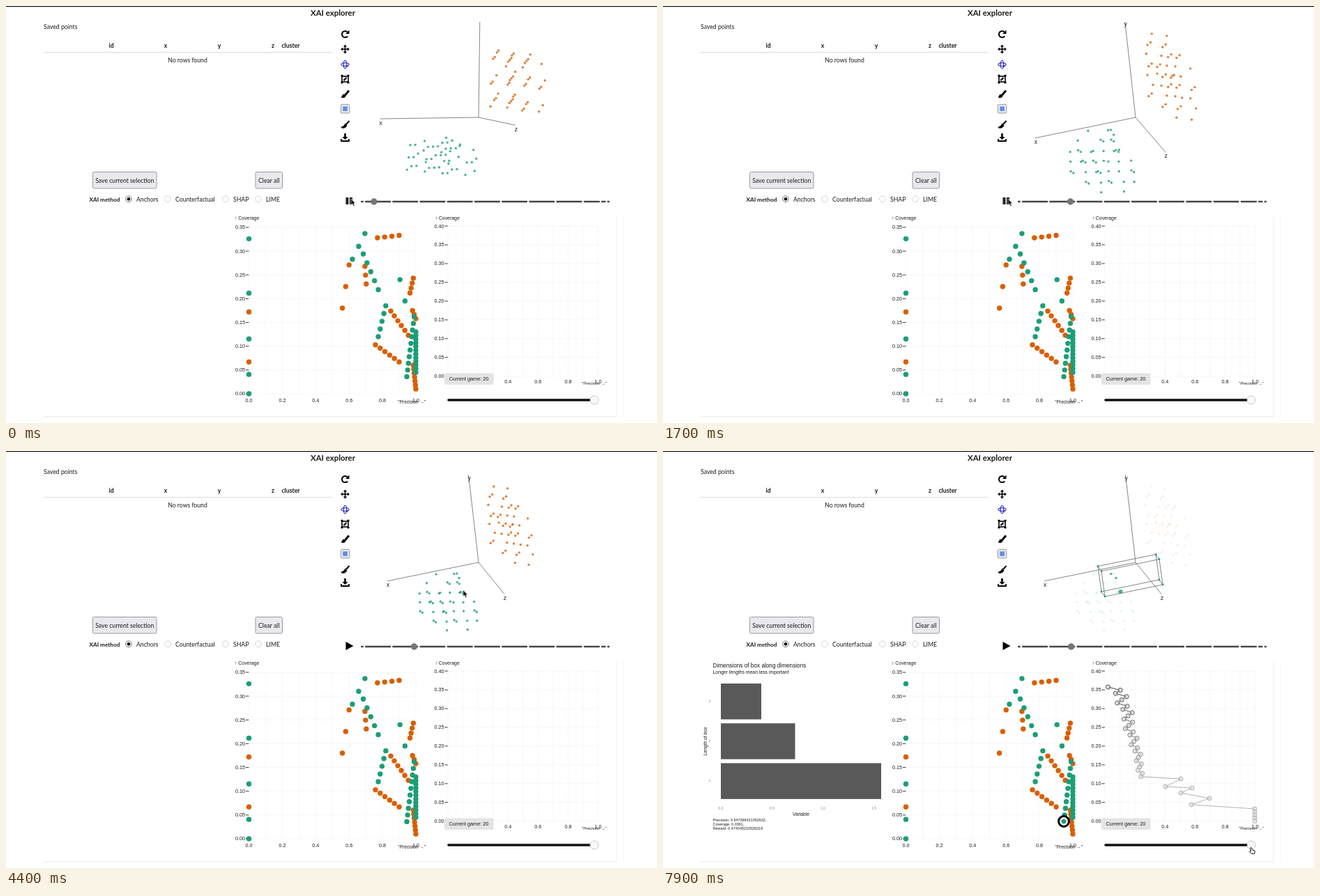
An HTML page that plays this animation: 934x599 px, repeating every 8 s.

```html
<!DOCTYPE html>
<html lang="en">
<head>
<meta charset="utf-8">
<title>XAI explorer</title>
<style>
html, body { margin: 0; width: 100%; height: 100%; overflow: hidden; background: #fff; }
svg { display: block; width: 934px; height: 599px; }
text { fill: #1b1b1b; }
.ui { font: 8.7px Lato, sans-serif; }
.b { font-weight: 700; }
.plot { font-family: "Liberation Sans", Arial, sans-serif; }
.grid { stroke: #eee; stroke-width: .8; stroke-dasharray: 2 1.5; }
.icon { fill: none; stroke: #000; stroke-width: 2; }
</style>
</head>
<body>
<svg id="stage" viewBox="0 0 934 599" xmlns="http://www.w3.org/2000/svg"></svg>
<script>
const LOOP = 8000, CX = 678, CY = 160, AXIS = 151;
const GREEN = '#1b9e77', ORANGE = '#d95f02';

const steps = (n, f) => Array.from({ length: n }, (_, i) => f(i));
const mix = (a, b, f) => a + (b - a) * f;
const spread = (i, k) => (i * k) % 1;

// Evenly scattered points inside a box given by its two corners.
const scatter = (n, lo, hi) => steps(n, i =>
  [.8192, .6711, .5497].map((k, d) => mix(lo[d], hi[d], spread(i + 1, k))));
const orangeCloud = scatter(48, [-80, 10, -95], [-28, 105, 95]);
const greenCloud = [[29, -33, -54], [25, -36, -40], [32, -40, 9.5],
  ...scatter(45, [18, -78, -90], [102, -30, 90])];

// Runs of evenly spaced dots: precision and coverage at both ends, then the count.
const run = ([p1, c1, p2, c2, n]) => steps(n, i => [mix(p1, p2, i / (n - 1)), mix(c1, c2, i / (n - 1))]);
const greenDots = [
  ...steps(5, i => [0, .326 * (1 - i / 4) ** 1.5]),
  ...[[.62, .283, .695, .337, 3], [.685, .294, .775, .219, 5], [.82, .185, .775, .12, 5],
    [.905, .24, .935, .195, 2], [.99, .162, .946, .036, 10], [1, .13, 1, .045, 12]].flatMap(run)];
const orangeDots = [[0, .172, 0, .067, 2], [.56, .18, .6, .271, 3], [.695, .268, .703, .231, 3],
  [.77, .328, .9, .333, 4], [.985, .243, .965, .212, 4], [.85, .174, .955, .123, 6],
  [.758, .103, .9, .067, 6], [.98, .175, 1, .158, 3], [.985, .06, 1, .01, 7]].flatMap(run);

// A narrow zigzag down, a few wide swings, then a drop at full precision.
const trail = [
  ...steps(29, i => [638.5 + 45 * (i / 28) ** .8 + 24 * spread(i, .618) * (1 - i / 40), 339 + 4.6 * i]),
  [743, 471], [721, 482], [759, 484], [743, 491], [784, 499], [758, 508],
  ...steps(5, i => [849, 514 + 4.4 * i])];

const line = (x1, y1, x2, y2, extra = '') => `<line x1="${x1}" y1="${y1}" x2="${x2}" y2="${y2}" ${extra}/>`;
const dot = (x, y, r, fill, extra = '') => `<circle cx="${x}" cy="${y}" r="${r}" fill="${fill}" ${extra}/>`;
const rect = (x, y, w, h, fill, extra = '') => `<rect x="${x}" y="${y}" width="${w}" height="${h}" fill="${fill}" ${extra}/>`;
const ui = (x, y, s, cls = '', extra = '') => `<text x="${x}" y="${y}" class="ui ${cls}" ${extra}>${s}</text>`;
const plot = (x, y, s, size, anchor = 'start', extra = '') =>
  `<text x="${x}" y="${y}" class="plot" font-size="${size}" text-anchor="${anchor}" ${extra}>${s}</text>`;
const MID = 'text-anchor="middle"';

function table() {
  return rect(0, 0, 934, 1.2, '#111') +
    ui(469, 13.5, 'XAI explorer', 'b', MID + ' style="font-size:11.4px"') +
    ui(54, 32.5, 'Saved points') +
    [['id', 151], ['x', 229], ['y', 306], ['z', 383], ['cluster', 408.5]].map(([s, x]) => ui(x, 60, s, 'b', MID)).join('') +
    line(54, 66.5, 467, 66.5, 'stroke="#ddd"') +
    ui(260.5, 81, 'No rows found', '', MID);
}

function controls() {
  const button = (x, w, s) =>
    rect(x, 238.5, w, 23.5, '#e9e9ed', 'rx="2" stroke="#9a9aa3"') + ui(x + w / 2, 253.5, s, '', MID);
  const radio = (x, s, on) =>
    dot(x, 277.3, 4.4, '#fff', `stroke="${on ? '#555' : '#ccc'}" stroke-width=".8"`) +
    (on ? dot(x, 277.3, 2.4, '#111') : '') + ui(x + 11, 280.5, s);
  return button(124.5, 91.5, 'Save current selection') + button(358, 38.5, 'Clear all') +
    ui(119.5, 280.5, 'XAI method', 'b', 'style="font-size:8.2px"') +
    radio(176, 'Anchors', true) + radio(232, 'Counterfactual') + radio(315, 'SHAP') + radio(362, 'LIME');
}

function toolbar() {
  const at = (y, s, color = '#000') => `<g transform="translate(486.5 ${y})" class="icon" style="stroke:${color}">${s}</g>`;
  const brush = '<path d="M5.5-5.5L0 1" stroke-width="3"/><path d="M-1 0Q2 2 0 4Q-3 6-6 4Q-4 3-4 1Q-3-1-1 0Z" fill="#000" stroke="none"/>';
  const heads = [0, 90, 180, 270].map(a => `<path d="M0-6.4L2.6-3.4H-2.6Z" fill="#000" stroke="none" transform="rotate(${a})"/>`).join('');
  return at(40.5, '<path d="M3.6 3A4.6 4.6 0 1 1 3.4-3.2"/><path d="M6-6V-.6H.6Z" fill="#000" stroke="none"/>') +
    at(62, '<path d="M0-5V5M-5 0H5" stroke-width="1.6"/>' + heads) +
    at(84, '<ellipse rx="5.6" ry="2.3" stroke-width="1.3"/><ellipse rx="2.3" ry="5.6" stroke-width="1.3"/><path d="M2 1L5 2L2 4.5Z" fill="#33c" stroke="none"/>', '#33c') +
    at(105, '<rect x="-4.5" y="-4" width="9" height="8" stroke-width="1.6"/><path d="M-2 2L2-2M-6-5H-3M3-5H6M-6 5H-3M3 5H6" stroke-width="2.4"/>') +
    at(127, brush) +
    rect(480.3, 141.3, 12.6, 12.6, '#e8e8ec', 'rx="2" stroke="#999"') + rect(483.3, 144.3, 6.6, 6.6, '#5b8def') +
    at(170.5, '<path d="M6-5.5L1.5-.5"/><path d="M0-2L3 1Q1 6-5 5L-6 3Q-2 3 0-2Z" fill="#000" stroke="none"/>') +
    at(189, '<path d="M0-6V0" stroke-width="2.6"/><path d="M-4-1H4L0 3Z" fill="#000" stroke="none"/><path d="M-5.5 2V5H5.5V2" stroke-width="1.8"/>');
}

function tourBar() {
  const cuts = [508, ...steps(9, i => 514 + 39.2 * i), 853, 861.5, 867];
  return cuts.slice(1).map((x, i) => line(cuts[i] + 1.2, 281, x - 1.2, 281, 'stroke="#444" stroke-width="2.4"')).join('');
}

function frame({ x0, dx, y0, dy, rows, bottom, right, label, skip }) {
  let s = '';
  for (let i = 0; i <= rows; i++) {
    const y = y0 - i * dy;
    s += line(x0, y, right, y, 'class="grid"') + line(x0 - 4.5, y, x0, y, 'stroke="#222" stroke-width=".9"') +
      plot(x0 - 5.5, y + 2.4, (i * .05).toFixed(2), 7.2, 'end');
  }
  for (let i = 0; i <= 10; i++) {
    const x = x0 + i * dx / 2;
    s += line(x, y0 - rows * dy, x, y0, 'class="grid"');
    if (i % 2 == 0 && i / 2 >= skip) s += plot(x, bottom, (i / 10).toFixed(1), 7.2, 'middle');
  }
  return s + plot(label, 307, '↑ Coverage', 6.9);
}

function charts() {
  const dots = (list, c) => list.map(([p, v]) => dot(348.5 + 239.5 * p, 557 - 683 * v, 3.7, c)).join('');
  return line(54, 590, 876, 590, 'stroke="#e8e8e8"') + line(876, 302, 876, 590, 'stroke="#eee"') + line(885.5, 302, 885.5, 590, 'stroke="#f5f5f5"') +
    frame({ x0: 348.5, dx: 47.9, y0: 557, dy: 34.15, rows: 7, bottom: 568.5, right: 590, label: 328, skip: 0 }) +
    plot(602, 571, '"Precision →"', 6.5, 'end') +
    dots(orangeDots, ORANGE) + dots(greenDots, GREEN) +
    frame({ x0: 634, dx: 43.1, y0: 531.7, dy: 26.95, rows: 8, bottom: 542, right: 851, label: 615.5, skip: 2 }) +
    plot(862, 544, '"Precision →"', 5.9, 'end');
}

function barChart() {
  const gray = 'style="fill:#888"';
  return plot(71.5, 310.5, 'Dimensions of box along dimensions', 8.23) +
    plot(71.5, 320, 'Longer lengths mean less important', 6.86) +
    [['z', 58], ['y', 106.5], ['x', 230]].map(([s, w], i) =>
      rect(83, 334 + 57.2 * i, w, 51.5, '#595959') + plot(67, 361 + 57.2 * i, s, 5, 'middle', gray)).join('') +
    steps(4, i => plot(83 + i * 73.2, 515, (i / 2).toFixed(1), 5, 'middle', gray)).join('') +
    plot(0, 0, 'Length of box', 6.7, 'middle', 'transform="translate(63 417) rotate(-90)"') +
    plot(198, 523.5, 'Variable', 6.7, 'middle') +
    ['Precision: 0.947368421052632,', 'Coverage: 0.0361,', 'Reward: 0.474045210526316']
      .map((s, i) => plot(71.5, 532.3 + i * 5.8, s, 5.45)).join('');
}

function history() {
  const tone = i => { const v = Math.round(mix(50, 170, Math.min(1, i / 30))); return `rgb(${v},${v},${v})`; };
  return trail.slice(1).map(([x, y], i) => line(...trail[i], x, y, `stroke="${tone(i)}" stroke-width=".9"`)).join('') +
    trail.map(([x, y], i) => dot(x, y, 3, '#ddd', `fill-opacity=".65" stroke="${tone(i)}" stroke-width=".9"`)).join('');
}

function box() {
  const corner = i => [717 - 83 * (i & 1) - 5 * (i >> 1 & 1) - 5 * (i >> 2),
    192 + 17 * (i & 1) - 36.5 * (i >> 1 & 1) - 7 * (i >> 2)];
  let s = '', d = '';
  for (let i = 0; i < 8; i++) {
    for (const b of [1, 2, 4]) if (!(i & b)) s += line(...corner(i), ...corner(i | b), 'stroke="#777" stroke-width=".9"');
    d += dot(...corner(i), 1.4, GREEN);
  }
  return s + d;
}

const cloud = (list, c) => list.map(() => dot(0, 0, 1.7, c, 'fill-opacity=".8" class="pt"')).join('');

document.getElementById('stage').innerHTML = `
  <clipPath id="view"><rect x="471" y="23" width="415" height="274"/></clipPath>
  ${table()}${controls()}${charts()}
  <g id="detail">${barChart()}${history()}
    ${dot(575, 532, 7.4, '#fff', 'stroke="#000" stroke-width="3"')}${dot(575, 532, 3.5, GREEN)}
  </g>
  ${rect(629, 527.5, 70.5, 16.5, '#e4e4e4', 'rx="2"')}${plot(664, 538.3, 'Current game: 20', 7.3, 'middle')}
  ${line(635, 566, 842, 566, 'stroke="#111" stroke-width="3.6" stroke-linecap="round"')}
  ${dot(844, 566, 6, '#f8f8f8', 'stroke="#bbb" stroke-width=".8"')}
  <g clip-path="url(#view)">
    ${['x', 'y', 'z'].map(s => line(CX, CY, CX, CY, 'class="axis" stroke="#777" stroke-width=".9"') + plot(0, 0, s, 8.5, 'middle', 'data-axis="1"')).join('')}
    ${cloud(orangeCloud, ORANGE)}${cloud(greenCloud, GREEN)}
    <g id="box">${box()}</g>
  </g>
  ${toolbar()}${tourBar()}<circle id="knob" cy="281" r="4.7" fill="#757575"/>
  <path id="pause" d="M487.5 275H491.5V285H487.5ZM493 275H497V285H493Z" fill="#222"/>
  <path id="play" d="M487.5 274L498.5 280L487.5 286Z"/>
  <g id="tip">${rect(628, 183, 27.5, 18, '#757575', 'rx="2"')}${plot(641.7, 194.5, 'id: 94', 8, 'middle', 'style="fill:#fff;font-weight:700"')}</g>
  <g id="cursor">
    <path id="arrow" d="M0 0V9L2.1 7.2L3.6 10.5L5.2 9.8L3.7 6.6H6.4Z" stroke="#fff" stroke-width=".6"/>
    <path id="hand" d="M1.5 1Q2.5-.4 3.5 1L4.4 4L8 5.2Q8.6 7 7.4 9.5H3.4L.4 6.4Q.5 5 2.4 6Z" fill="#fff" stroke="#111" stroke-width="1"/>
  </g>`;

const $ = id => document.getElementById(id);
const all = q => [...document.querySelectorAll(q)];
const points = [...orangeCloud, ...greenCloud];
const firstGreen = orangeCloud.length, picked = firstGreen + 2;
const ptEls = all('.pt'), axisEls = all('.axis'), axisLabels = all('[data-axis]');

// Each key is [time, ...values], joined linearly.
function track(keys, t) {
  if (t <= keys[0][0]) return keys[0].slice(1);
  const i = keys.findIndex(k => k[0] > t);
  if (i < 0) return keys[keys.length - 1].slice(1);
  const a = keys[i - 1], b = keys[i], f = (t - a[0]) / (b[0] - a[0]);
  return a.slice(1).map((v, j) => mix(v, b[j + 1], f));
}

// Right and down parts of the x, y and z axes at each stop of the tour.
const turn = [
  [0, -142, 2, 53, 2, -149, 11],
  [800, -91, 12.5, 119, 15, -149, 27],
  [1720, -145, -16, 41, 30, -139, 50]];
const zoom = [[2500, 1], [2800, 1.63], [3100, .81], [3300, .79], [3400, .79], [3700, .905]];
const knob = [[0, 528], [800, 556], [1700, 584.5], [1900, 585.5]];
const mouse = [[2000, 495, 277], [2400, 676, 203], [4100, 676, 203], [4400, 656, 200], [6700, 656, 200],
  [7200, 785, 340], [7600, 908, 488], [7700, 868, 540], [7900, 841, 569]];
const tip = [[4400, 0], [4700, 1], [6700, 1], [6900, 0]];
const focus = [[5300, 0], [5600, 1]];

const dotp = (a, b) => a[0] * b[0] + a[1] * b[1] + a[2] * b[2];
const unit = a => a.map(v => v / Math.sqrt(dotp(a, a)));

function projector(t) {
  const m = track(turn, t), [s] = track(zoom, t);
  const u = unit(m.slice(0, 3)), v0 = m.slice(3), k = dotp(u, v0);
  const v = unit(v0.map((c, i) => c - k * u[i]));
  return p => [CX + s * dotp(u, p), CY + s * dotp(v, p)];
}

const put = (el, o) => { for (const k in o) el.setAttribute(k, o[k]); };
const show = (id, on) => put($(id), { visibility: on ? 'visible' : 'hidden' });

function draw(t) {
  const at = projector(t), [f] = track(focus, t);
  axisEls.forEach((el, i) => {
    const [x, y] = at([0, 1, 2].map(d => d == i ? AXIS : 0));
    put(el, { x2: x, y2: y });
    put(axisLabels[i], { x: x + 1, y: y + 8.5 });
  });
  points.forEach((p, i) => {
    const [cx, cy] = at(p), kept = i >= firstGreen && i <= picked;
    put(ptEls[i], { cx, cy, r: i == picked && t >= 4500 ? 3 : 1.7, opacity: kept ? 1 : 1 - .87 * f });
  });
  put($('box'), { opacity: f });
  put($('tip'), { opacity: track(tip, t)[0] });
  put($('knob'), { cx: track(knob, t)[0] });
  put($('cursor'), { transform: `translate(${track(mouse, t)})` });
  show('detail', t >= 5500);
  show('pause', t < 1900);
  show('play', t >= 1900);
  show('arrow', t < 7800);
  show('hand', t >= 7800);
}

const start = performance.now();
function tick(now) {
  const t = Math.max(0, now - start) % LOOP;
  draw(Math.floor(t / 100) * 100);
  requestAnimationFrame(tick);
}
draw(0);
requestAnimationFrame(tick);
</script>
</body>
</html>
```
